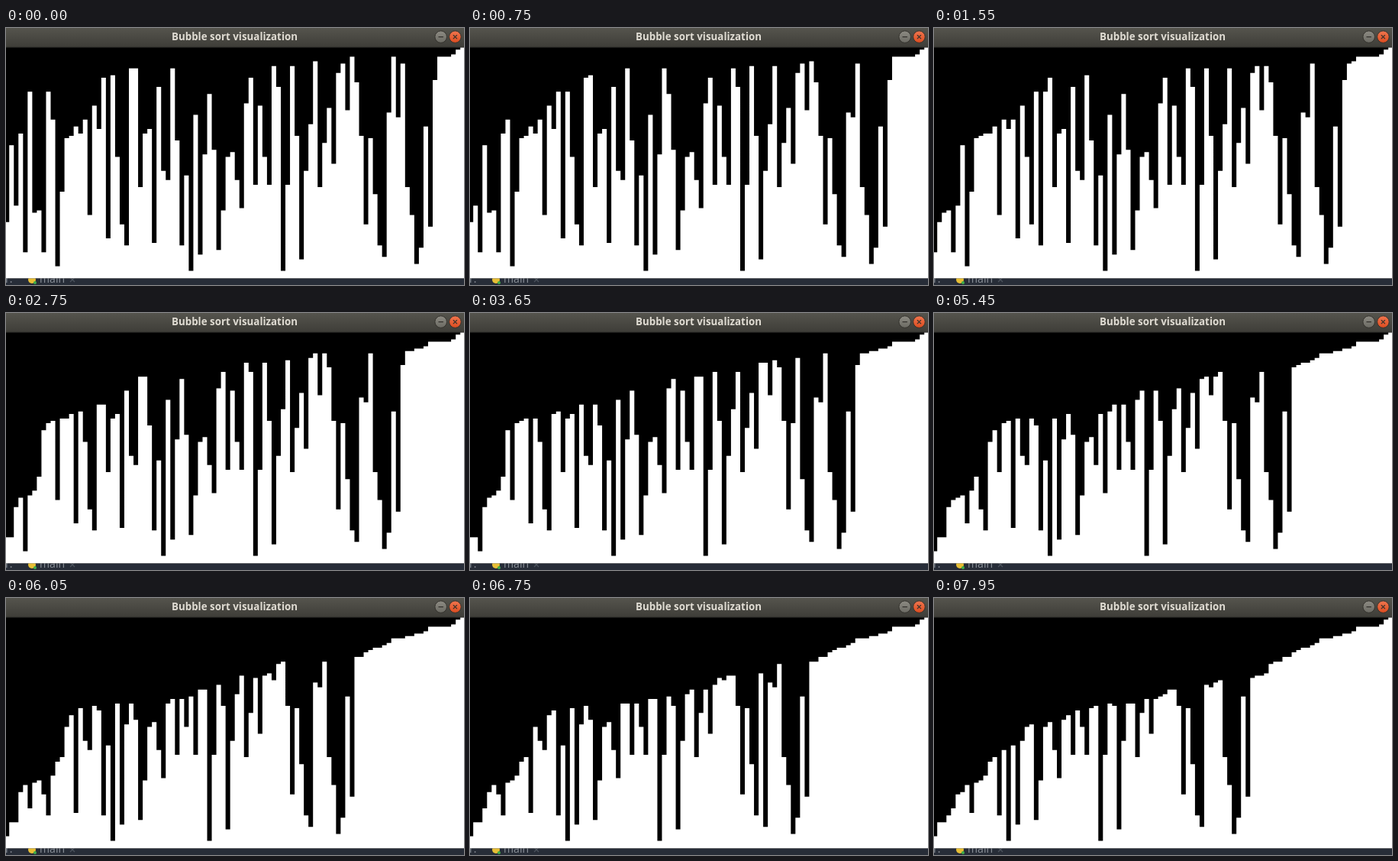
An HTML page for the animation above (8 s loop, 600 px wide and 336 px high).

```html
<!DOCTYPE html>
<html lang="en">
<head>
<meta charset="utf-8">
<title>Bubble sort visualization</title>
<style>
  html, body { margin: 0; width: 100%; height: 100%; overflow: hidden; background: #000; }
  svg { display: block; width: 100vw; height: 100vh; }
  .title { font: bold 13.35px "Open Sans", "Noto Sans", sans-serif; fill: #dfdbd2; }
  .tab { font: 14px "Noto Sans", "Open Sans", sans-serif; fill: #858b94; }
</style>
</head>
<body>
<svg viewBox="0 0 600 336" preserveAspectRatio="none">
  <defs>
    <linearGradient id="bar" x2="0" y2="1">
      <stop offset="0" stop-color="#55544d"/>
      <stop offset="1" stop-color="#3e3d38"/>
    </linearGradient>
    <linearGradient id="grey" x2="0" y2="1">
      <stop offset="0" stop-color="#8d8b83"/>
      <stop offset="1" stop-color="#6b6a63"/>
    </linearGradient>
    <linearGradient id="orange" x2="0" y2="1">
      <stop offset="0" stop-color="#f1764f"/>
      <stop offset="1" stop-color="#dd4c1f"/>
    </linearGradient>
  </defs>

  <!-- editor strip behind the window -->
  <rect y="320" width="600" height="16" fill="#272d38"/>
  <text class="tab" x="-1" y="332.5">r:</text>
  <circle cx="34" cy="329" r="5" fill="#e8bf35"/>
  <circle cx="38" cy="333" r="2" fill="#3fae49"/>
  <text class="tab" x="44" y="332.5">main</text>
  <path d="M84 326l6 6M90 326l-6 6" stroke="#4d545f" stroke-width="1.2"/>

  <!-- window -->
  <rect y="25" width="600" height="302.3"/>
  <path id="bars" fill="#fff"/>
  <rect width="600" height="25.3" fill="url(#bar)"/>
  <rect y="24.5" width="600" height=".8" fill="#33322e"/>
  <text class="title" x="299.5" y="16" text-anchor="middle">Bubble sort visualization</text>
  <g stroke="#33312c">
    <circle cx="569.7" cy="11.6" r="7.8" fill="url(#grey)"/>
    <circle cx="588.4" cy="11.6" r="7.8" fill="url(#orange)"/>
    <path d="M566.5 11.6h6.4M585.9 9.1l5 5M590.9 9.1l-5 5" fill="none" stroke-width="1.3"/>
  </g>
</svg>
<script>
  const LOOP = 8000, TICK = 50, STEPS = 120, SWAPS = 11;
  const PITCH = 6.03, LEFT = -1.8, TOP = 25.3, UNIT = 3.045, BOTTOM = 327.3;

  // Gap above each bar, in units; the first sweep is already at index 84.
  const gaps = [
    75, 42, 68, 37, 88, 19, 71, 70, 88, 19, 31, 94, 62, 39, 38, 34, 37, 31, 72, 25,
    35, 13, 82, 12, 47, 76, 85, 9, 9, 60, 37, 35, 84, 17, 53, 57, 9, 40, 85, 55,
    96, 29, 89, 46, 20, 44, 87, 70, 47, 45, 57, 69, 24, 13, 59, 25, 47, 59, 8, 17,
    96, 59, 8, 38, 91, 53, 33, 6, 60, 41, 26, 50, 11, 7, 27, 4, 15, 38, 76, 39,
    63, 85, 90, 28, 4, 30, 7, 60, 72, 93, 86, 34, 77, 14, 4, 4, 4, 3, 1, 0
  ];
  const slowSteps = [12, 50, 56, 62, 92]; // one swap fewer
  let pos = 84;

  function nextSwap() {
    while (gaps[pos] >= gaps[pos + 1] || pos >= gaps.length - 1) {
      pos = pos >= gaps.length - 1 ? 0 : pos + 1;
    }
    [gaps[pos], gaps[pos + 1]] = [gaps[pos + 1], gaps[pos]];
    pos++;
  }

  function outline() {
    let d = `M${LEFT} ${BOTTOM}`;
    gaps.forEach((gap, i) => {
      d += `V${(TOP + gap * UNIT).toFixed(2)}H${(LEFT + (i + 1) * PITCH).toFixed(2)}`;
    });
    return d + `V${BOTTOM}Z`;
  }

  const shapes = [outline()];
  for (let step = 1; step < STEPS; step++) {
    const count = SWAPS - slowSteps.includes(step);
    for (let n = 0; n < count; n++) nextSwap();
    shapes.push(outline());
  }

  const bars = document.getElementById("bars");
  let shown = -1;

  // 15 steps per second, snapped to 50 ms ticks
  function draw(ms) {
    const tick = Math.floor((ms % LOOP) / TICK);
    const step = Math.floor((3 * tick + 1) / 4);
    if (step !== shown) bars.setAttribute("d", shapes[shown = step]);
  }

  const start = performance.now();
  function loop() {
    draw(performance.now() - start);
    requestAnimationFrame(loop);
  }
  loop();
</script>
</body>
</html>
```
